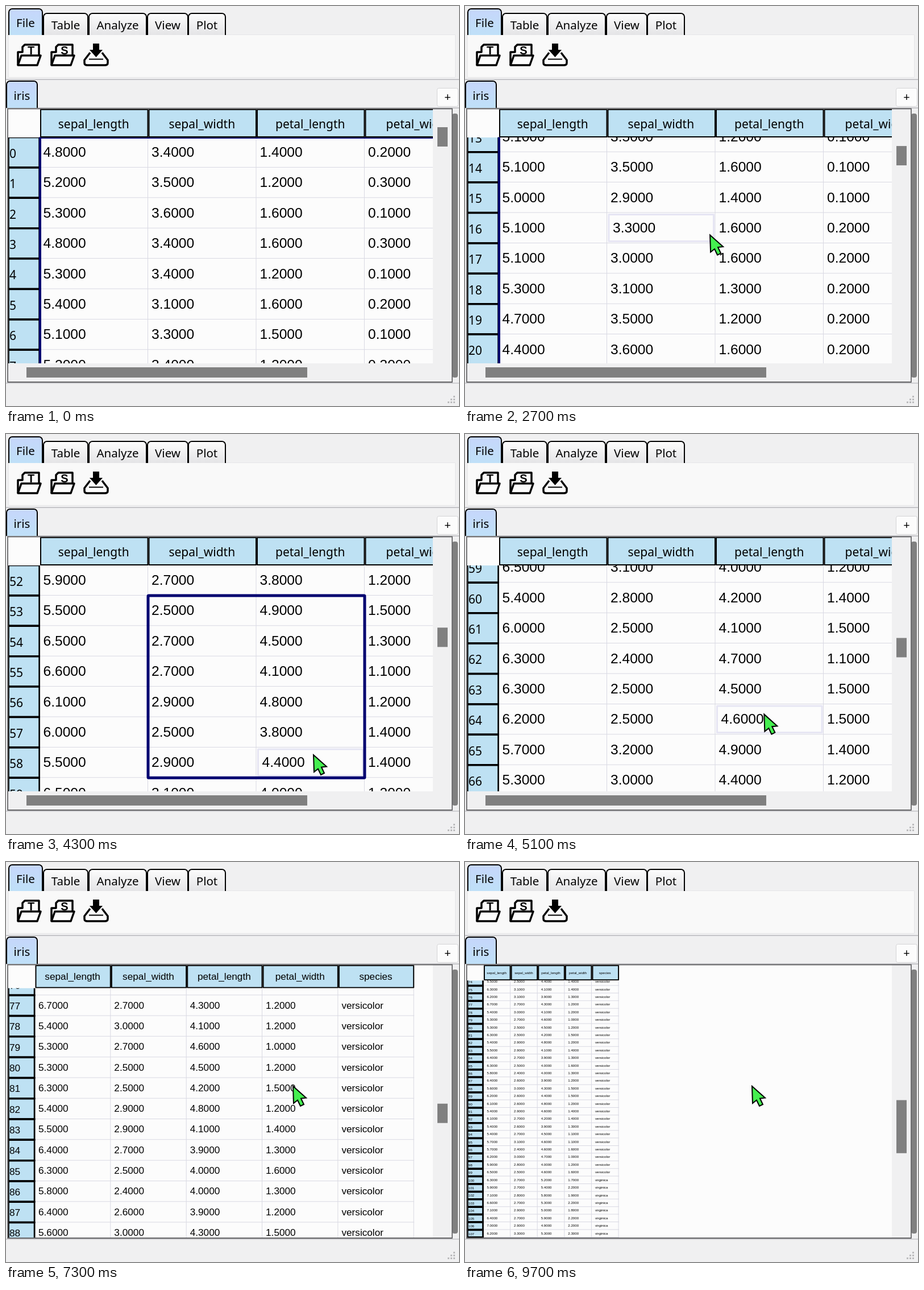
An HTML page with a canvas for the animation above (9800 ms loop, 797 by 703 pixels).

```html
<!DOCTYPE html>
<html lang="en">
<head>
<meta charset="utf-8">
<title>Table viewer</title>
<style>
html, body { margin: 0; width: 100%; height: 100%; overflow: hidden; background: #f0f0f1; }
canvas { display: block; }
</style>
</head>
<body>
<canvas id="stage" width="797" height="703"></canvas>
<script>
const ctx = document.getElementById('stage').getContext('2d');
const LOOP = 9800, STEP = 100, ROWS = 150;
const UI = '"Noto Sans", sans-serif', CELL = '"Liberation Sans", Arial, sans-serif';
const BLUE = '#bee1f3', NAVY = '#000070', GREY = '#808080', GRID = '#d9d9e3', PAPER = '#fcfcfc';
const VIEW = { left: 4, top: 181, right: 751 };
const COLUMNS = ['sepal_length', 'sepal_width', 'petal_length', 'petal_width', 'species'];

// Measurements scatter around the species mean.
const SPECIES = [
  { name: 'setosa', mean: [4.9, 3.3, 1.4, 0.2], spread: [0.5, 0.4, 0.2, 0.1] },
  { name: 'versicolor', mean: [6, 2.8, 4.4, 1.3], spread: [0.7, 0.4, 0.6, 0.3] },
  { name: 'virginica', mean: [6.6, 3, 5.6, 2], spread: [0.7, 0.4, 0.7, 0.3] }
];
const noise = n => { const v = Math.sin(n * 12.9898 + 4) * 43758.5453; return (v - Math.floor(v)) * 2 - 1; };
const table = Array.from({ length: ROWS }, (_, row) => {
  const { name, mean, spread } = SPECIES[Math.floor(row / 50)];
  const values = mean.map((m, c) => m + spread[c] * noise(row * 4 + c));
  return [...values.map(v => (Math.round(v * 10) / 10).toFixed(4)), name];
});

// Piecewise linear interpolation over [time, ...values] keys.
function track(keys, t) {
  const last = keys[keys.length - 1];
  if (t <= keys[0][0]) return keys[0].slice(1);
  if (t >= last[0]) return last.slice(1);
  const i = keys.findIndex(k => k[0] > t), a = keys[i - 1], b = keys[i];
  const u = (t - a[0]) / (b[0] - a[0]);
  return a.slice(1).map((v, j) => v + (b[j + 1] - v) * u);
}
const SCROLL = [[2300, 0], [3400, 37.15], [3800, 52], [4700, 52], [5900, 74.27]];
const ZOOM = [[6200, 1], [7300, 0.7], [7700, 0.7], [9200, 0.25]];
const POINTER = [[1100, 330, -40], [1700, 395, 111], [2300, 430, 400], [3400, 433, 407],
  [3800, 330, 310], [4300, 541, 564], [4700, 541, 564], [5300, 519, 457], [5900, 519, 457], [6200, 505, 394]];

function layout(zoom) {
  return {
    x0: 19.7 + 57.3 * zoom - 17 * zoom ** 2,
    colW: 190.5 * zoom,
    headH: 19.5 + 30.5 * zoom,
    rowH: 2.1 + 43.2 * zoom + 8.1 * zoom ** 2,
    size: 24.6 * zoom,
    shift: 17.6 * (1 - zoom) * (zoom - 0.25)
  };
}

function box(x, y, w, h, fill, stroke, line = 1, radius = 0) {
  ctx.beginPath();
  ctx.roundRect(x, y, w, h, radius);
  if (fill) { ctx.fillStyle = fill; ctx.fill(); }
  if (stroke) { ctx.strokeStyle = stroke; ctx.lineWidth = line; ctx.stroke(); }
}
function label(text, x, y, font, align = 'left') {
  ctx.font = font;
  ctx.textAlign = align;
  ctx.fillStyle = '#000';
  ctx.fillText(text, x, y);
}
function shape(d, fill, line) {
  const path = new Path2D(d);
  if (fill) { ctx.fillStyle = fill; ctx.fill(path); }
  if (line) { ctx.strokeStyle = '#000'; ctx.lineWidth = line; ctx.stroke(path); }
}
function clipped(x, y, right, bottom, draw) {
  ctx.save();
  ctx.beginPath();
  ctx.rect(x, y, right - x, bottom - y);
  ctx.clip();
  draw();
  ctx.restore();
}

function tab(text, left, right, top, bottom, active) {
  const fill = ctx.createLinearGradient(0, top, 0, bottom);
  fill.addColorStop(0, active ? '#c6d6fb' : '#fdfdfd');
  fill.addColorStop(1, active ? '#bfe0f8' : '#e4e4e6');
  clipped(left - 2, top - 2, right + 2, bottom, () =>
    box(left + 1, top + 1, right - left - 2, bottom - top + 10, fill, '#000', 2, 6));
  label(text, (left + right) / 2, bottom - (active ? 14 : 10), `20.5px ${UI}`, 'center');
}
function folder(x, letter) {
  ctx.save();
  ctx.translate(x, 66);
  ctx.lineJoin = 'round';
  shape('M2 38V15H10V6L14 2H39V20', PAPER, 3.5);
  shape('M8 21H42L36 38H2Z', PAPER, 3.5);
  label(letter, 25, 19, `bold 20px ${CELL}`, 'center');
  ctx.restore();
}
function drawChrome() {
  box(0, 0, 797, 703, '#f0f0f1');
  box(4.5, 50.5, 786, 75, '#f9f9f9', '#e6e6e8');
  box(0, 128.5, 797, 1.5, '#b9b9bd');
  tab('File', 4, 65, 4, 51, true);
  tab('Table', 65, 145, 12, 51);
  tab('Analyze', 145, 248, 12, 51);
  tab('View', 248, 321, 12, 51);
  tab('Plot', 320, 387, 12, 51);
  folder(19, 'T');
  folder(78, 'S');
  ctx.lineJoin = 'round';
  shape('M148 82L138 95V100Q138 104 143 104H174Q179 104 179 100V95L169 82', PAPER, 3.5);
  shape('M146 93.5H171', null, 2);
  shape('M153 66H164V77H170L158.5 90L147 77H153Z', '#000');
  box(0, 178.5, 797, 1.5, '#b9b9bd');
  tab('iris', 0, 56, 131, 179, true);
  box(758.5, 144.5, 37, 32, PAPER, '#d4d4d6', 1, 3);
  label('+', 777, 167, `20px ${UI}`, 'center');
  box(785, 189, 10, 464, GREY, null, 0, 4);
  box(0, 662, 797, 1.5, '#c4c4c8');
  for (let i = 0; i < 3; i++)
    for (let j = 0; j <= i; j++) box(787 - j * 5, 685 + i * 5, 3, 3, '#bcbcbe');
}

function drawTable(t, x, y) {
  const zoom = Math.round(track(ZOOM, t)[0] * 20) / 20;
  const { x0, colW, headH, rowH, size, shift } = layout(zoom);
  const scroll = track(SCROLL, t)[0] + shift;
  const wide = colW * 5 > VIEW.right - x0, bottom = wide ? 628 : 660;
  const headBottom = VIEW.top + headH, origin = headBottom - 0.5;
  const visibleRows = (bottom - headBottom) / rowH;
  const rowTop = r => origin + (r - scroll) * rowH;
  const colLeft = c => x0 + c * colW;
  const headFont = zoom === 1 ? `21px ${UI}` : `${size}px ${CELL}`;
  const first = Math.floor(scroll), last = Math.min(ROWS - 1, Math.ceil(scroll + visibleRows));
  const cellAt = (px, py) => [Math.floor(scroll + (py - origin) / rowH), Math.floor((px - x0) / colW)];
  const hover = zoom === 1 && y > headBottom && t >= 1100 ? cellAt(x, y) : [-1, -1];

  box(3, 180.5, 782, 480.5, '#f0f0f1');
  box(VIEW.left, VIEW.top, VIEW.right - VIEW.left, bottom - VIEW.top, PAPER);

  clipped(x0 - 2, headBottom, VIEW.right, bottom, () => {
    for (let r = first; r <= last; r++) {
      const top = rowTop(r);
      box(x0, top + rowH - 1, colW * 5, 1, GRID);
      table[r].forEach((text, c) => {
        const left = colLeft(c), active = r === hover[0] && c === hover[1];
        if (active) box(left + 2.5, top + 3, colW - 6, rowH - 6.5, null, '#e6e5f3', 3);
        label(text, left + (active ? 9.5 : 5.5), top + rowH / 2 + size * 0.345 - 0.7, `${size}px ${CELL}`);
      });
    }
    for (let c = 1; c <= 5; c++) box(colLeft(c) - 1.5, headBottom, 1, bottom - headBottom, GRID);
  });

  clipped(VIEW.left, headBottom, x0, bottom, () => {
    for (let r = first; r <= last; r++) {
      const top = rowTop(r);
      box(VIEW.left, top, x0 - VIEW.left - 1, rowH, BLUE, '#000', 3.5);
      label(r, 6, top + rowH / 2 + size * 0.35 + zoom, headFont);
    }
  });

  // Everything is selected until a drag marks a block of cells.
  clipped(x0 - 2, headBottom - 0.5, VIEW.right, bottom, () => {
    let from = [0, 0], to = [ROWS - 1, 4];
    if (t >= 3900) {
      from = [53, 1];
      to = t < 4300 ? cellAt(x, y) : [58, 2];
    }
    box(colLeft(from[1]) - 0.5, rowTop(from[0]), (to[1] - from[1] + 1) * colW,
      (to[0] - from[0] + 1) * rowH, null, NAVY, 5, 1);
  });

  clipped(VIEW.left, VIEW.top, VIEW.right, headBottom, () => {
    COLUMNS.forEach((name, c) => {
      box(colLeft(c) + 1, VIEW.top + 1, colW - 2, headH - 2, BLUE, '#000', 2);
      label(name, colLeft(c) + colW / 2 - 1, VIEW.top + headH / 2 + size * 0.35, headFont, 'center');
    });
  });

  const trackH = bottom - 245, thumbH = Math.max(34, trackH * visibleRows / ROWS);
  box(759, 213 + scroll * (trackH - thumbH) / (ROWS - visibleRows), 18, thumbH, GREY);
  if (wide) box(36, 635, 494 / zoom, 18, GREY);
  box(3, 180.5, 782, 480.5, null, '#68686a', 1.8);
}

function drawPointer(x, y) {
  ctx.save();
  ctx.translate(x, y);
  ctx.lineJoin = 'miter';
  shape('M0 0L1 30L8 24.5L13 35L19 32L14 21.5L23 20.5Z', '#45ef50', 2);
  ctx.restore();
}

function render() {
  const t = Math.floor(performance.now() % LOOP / STEP) * STEP;
  const [x, y] = track(POINTER, t);
  drawChrome();
  drawTable(t, x, y);
  if (t >= 1100) drawPointer(x, y);
  requestAnimationFrame(render);
}
render();
</script>
</body>
</html>
```
